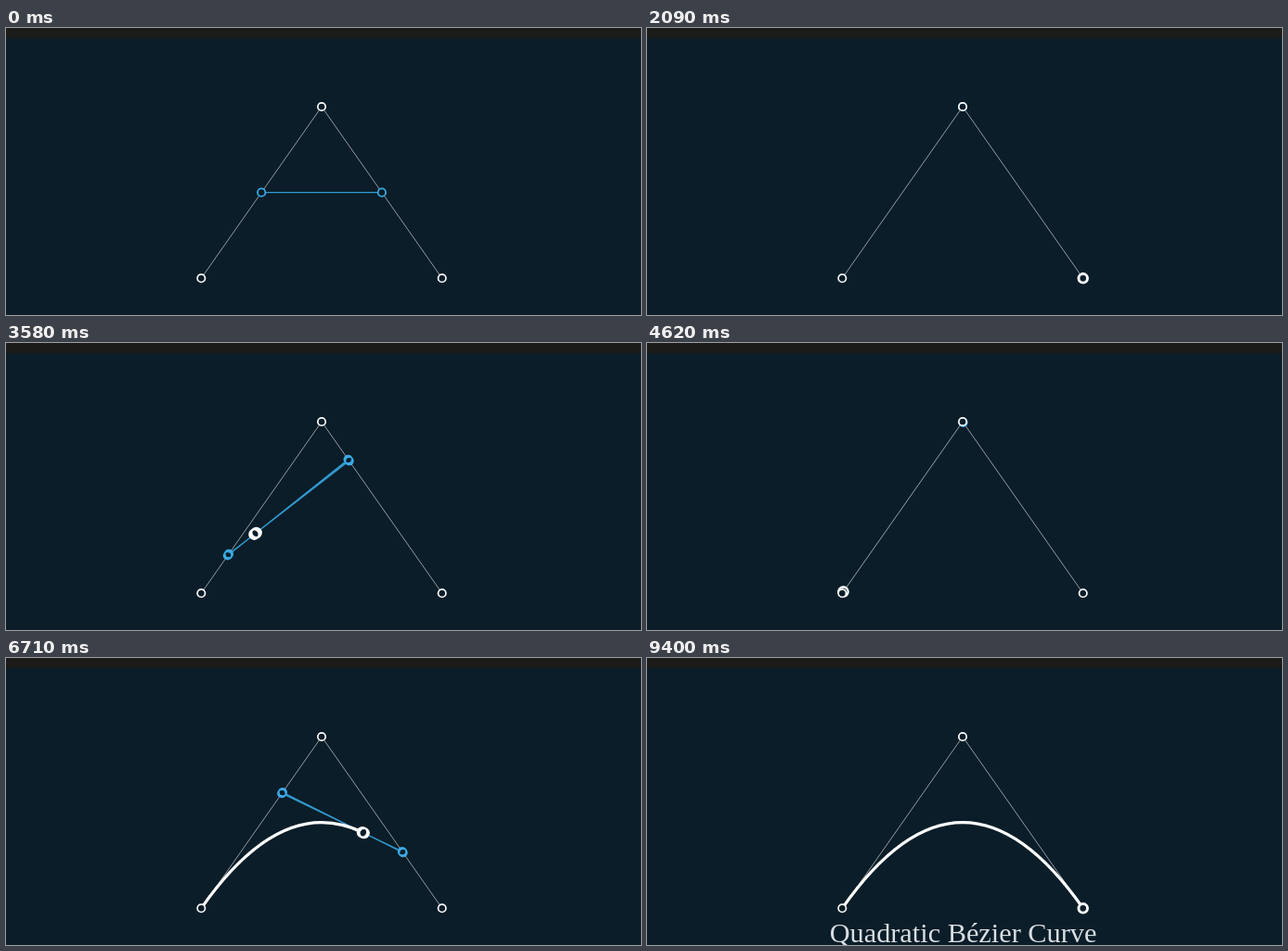
These frames come from a looping animation (684x310 px, 9.8 s). An HTML page with a canvas:

```html
<!DOCTYPE html>
<html lang="en">
<head>
<meta charset="utf-8">
<title>Quadratic Bézier Curve</title>
<style>
  html, body { margin: 0; width: 100%; height: 100%; overflow: hidden; background: #0b1d28; }
  canvas { display: block; position: absolute; left: 0; top: 0; }
  #title {
    position: absolute; left: 0; top: 280px; width: 681px; height: 30px;
    overflow: hidden; text-align: center; white-space: nowrap; opacity: 0;
    font: 30.3px/34px "Liberation Serif", "Times New Roman", serif;
    color: #d8dee2;
  }
</style>
</head>
<body>
<canvas id="stage" width="684" height="310"></canvas>
<div id="title">Quadratic Bézier Curve</div>
<script>
const W = 684, H = 310;
const LOOP = 9800, STEP = 149, LAST = 63;
const SHUTTER = 14, SAMPLES = 7;
const BG = '#0b1d28', BAR = '#1b1b1a', INK = '#ffffff', BLUE = '#38a9e4';
const A = [210.3, 270.3], B = [340, 85], C = [469.7, 270.3];

const view = document.getElementById('stage').getContext('2d');
const title = document.getElementById('title');
const layer = document.createElement('canvas');
layer.width = W;
layer.height = H;
const ctx = layer.getContext('2d');

const clamp = v => Math.min(1, Math.max(0, v));
const mix = (p, q, t) => [p[0] + (q[0] - p[0]) * t, p[1] + (q[1] - p[1]) * t];

// Quadratic ease in until mid, then ease out until end
function ease(t, start, mid, end) {
  if (t <= start) return 0;
  if (t >= end) return 1;
  return t < mid
    ? 0.5 * ((t - start) / (mid - start)) ** 2
    : 1 - 0.5 * ((end - t) / (end - mid)) ** 2;
}

const BACK_START = 2093, DRAW_START = 4440;

function position(ms) {
  if (ms < BACK_START) return 0.5 + 0.5 * ease(ms, 894, 1453, 2012);
  if (ms < DRAW_START) return 1 - ease(ms, BACK_START, 3208, 4323);
  return ease(ms, DRAW_START, 6370, 8125);
}

function line(p, q, color, width, alpha) {
  ctx.globalAlpha = alpha;
  ctx.strokeStyle = color;
  ctx.lineWidth = width;
  ctx.beginPath();
  ctx.moveTo(...p);
  ctx.lineTo(...q);
  ctx.stroke();
  ctx.globalAlpha = 1;
}

function ring(p, r, width, color, alpha = 1) {
  ctx.globalAlpha = alpha;
  ctx.beginPath();
  ctx.arc(p[0], p[1], r, 0, Math.PI * 2);
  ctx.fillStyle = BG;
  ctx.fill();
  ctx.strokeStyle = color;
  ctx.lineWidth = width;
  ctx.stroke();
  ctx.globalAlpha = 1;
}

function scene(ms) {
  const t = position(ms);
  const q0 = mix(A, B, t), q1 = mix(B, C, t), p = mix(q0, q1, t);
  const fade = clamp((8125 - ms) / 250);

  ctx.fillStyle = BG;
  ctx.fillRect(0, 0, W, H);
  ctx.fillStyle = BAR;
  ctx.fillRect(0, 0, W, 11);

  line(q0, q1, BLUE, 1.2, 0.9 * clamp(Math.min(t, 1 - t) / 0.08));
  line(A, B, INK, 0.8, 0.7);
  line(B, C, INK, 0.8, 0.7);

  if (ms > DRAW_START) {
    ctx.strokeStyle = INK;
    ctx.lineWidth = 3.2;
    ctx.beginPath();
    ctx.moveTo(...A);
    ctx.quadraticCurveTo(...q0, ...p);
    ctx.stroke();
  }

  ring(q0, 4.2, 1.8, BLUE, fade);
  ring(q1, 4.2, 1.8, BLUE, fade);

  const pop = clamp(ms / (3 * STEP));
  if (pop > 0) {
    const scale = 1 + 3.1 * (1 - pop) ** 2;
    ring(p, 5.2 * scale, 2.1 * scale, INK, pop);
  }
  [A, B, C].forEach(c => ring(c, 4.2, 1.7, INK));
}

// Keeps the lightest of several moments, so moving strokes smear wider
function render(ms) {
  for (let i = 0; i < SAMPLES; i++) {
    const shift = ms ? (i / (SAMPLES - 1) - 0.5) * SHUTTER : 0;
    scene(ms + shift);
    view.globalCompositeOperation = i ? 'lighten' : 'source-over';
    view.drawImage(layer, 0, 0);
  }
  title.style.opacity = clamp((ms - 52 * STEP) / (4 * STEP));
}

const origin = performance.now();
let shown = -1;

function tick() {
  const ms = (performance.now() - origin) % LOOP;
  const step = Math.min(LAST, Math.floor(ms / STEP));
  if (step !== shown) {
    shown = step;
    render(step * STEP);
  }
  requestAnimationFrame(tick);
}
tick();
</script>
</body>
</html>
```
